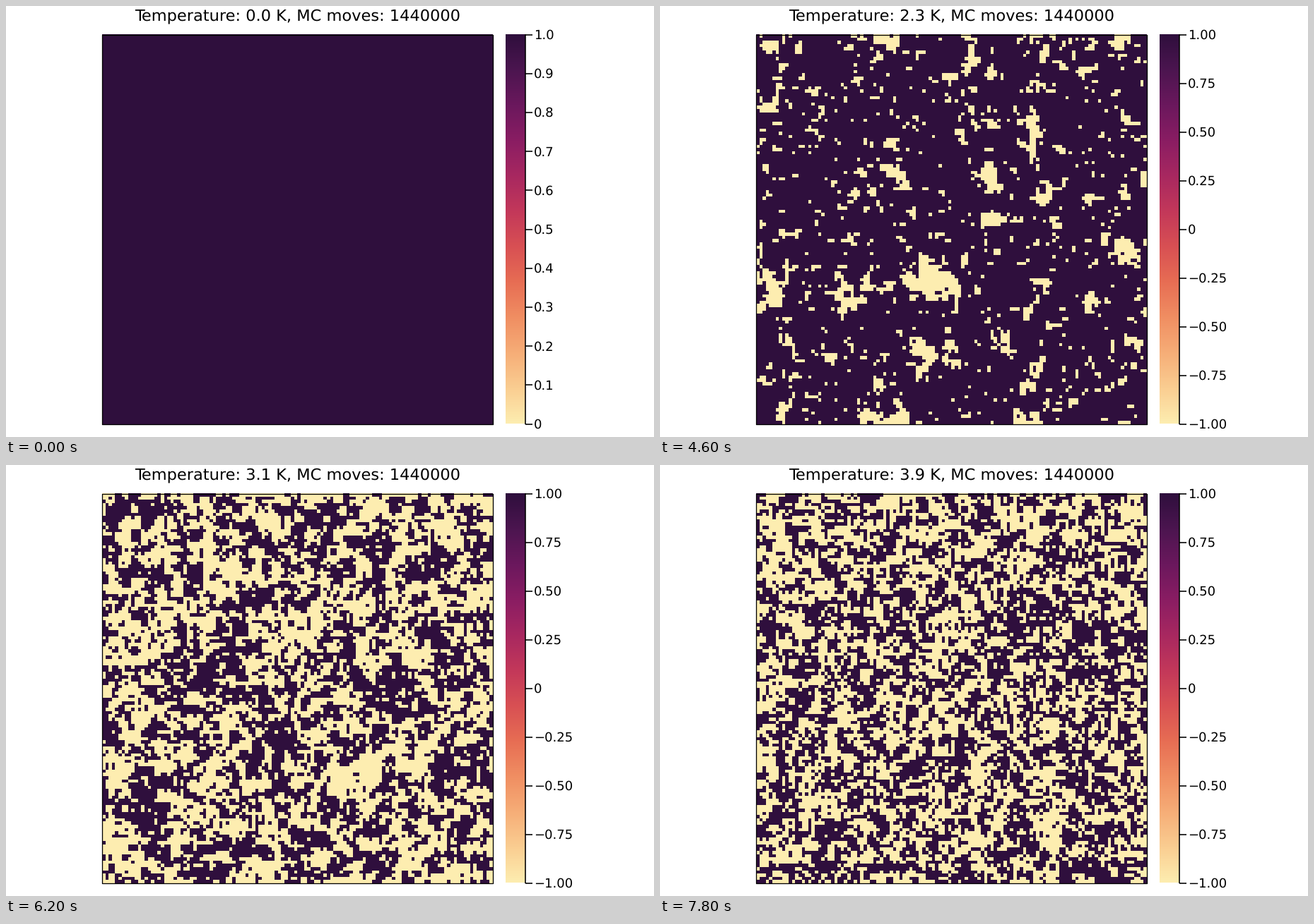
Animation, 917 px wide and 611 px high, one loop 8 s. Source, as a matplotlib script:

```python
import numpy as np
import matplotlib.pyplot as plt
from matplotlib.animation import FuncAnimation
from matplotlib.colors import LinearSegmentedColormap
from matplotlib.patches import Rectangle

W, H, DPI = 917, 611, 100
N = 120            # spins per side
STEPS = 40         # temperatures 0.0 K to 3.9 K
SWEEPS = 60        # lattice sweeps per temperature
LEFT, RIGHT, TOP, BOTTOM = 136, 689, 40, 593
BAR_L, BAR_R = 707, 735

plt.rcParams["font.family"] = "DejaVu Sans"
plt.rcParams["text.hinting"] = "none"

STOPS = [
    (253, 237, 176), (250, 205, 145), (246, 173, 119), (240, 142, 98),
    (231, 109, 84), (216, 80, 83), (195, 56, 90), (168, 40, 96),
    (138, 29, 99), (107, 24, 93), (76, 21, 80), (47, 15, 61),
]
CMAP = LinearSegmentedColormap.from_list(
    "heat", [tuple(c / 255 for c in s) for s in STOPS], N=512)


def simulate():
    """Warm up a periodic Ising lattice, one snapshot per temperature."""
    rng = np.random.default_rng(12)
    spins = np.ones((N, N))
    rows, cols = np.indices((N, N))
    masks = [(rows + cols) % 2 == k for k in (0, 1)]
    shots = []
    for step in range(STEPS):
        temp = max(step / 10, 0.01)
        for _ in range(SWEEPS):
            for mask in masks:
                field = (np.roll(spins, 1, 0) + np.roll(spins, -1, 0)
                         + np.roll(spins, 1, 1) + np.roll(spins, -1, 1))
                p_up = 0.5 * (1 + np.tanh(field / temp))
                drawn = np.where(rng.random((N, N)) < p_up, 1.0, -1.0)
                spins = np.where(mask, drawn, spins)
        shots.append(spins)
    return shots


def px(size):
    """Pixels to points."""
    return size * 72 / DPI


fig = plt.figure(figsize=(W / DPI, H / DPI), dpi=DPI, facecolor="white")
ax = fig.add_axes([0, 0, 1, 1])
ax.axis("off")

shots = simulate()
image = ax.imshow(shots[0], cmap=CMAP, vmin=-1, vmax=1, aspect="auto",
                  interpolation="nearest",
                  extent=(LEFT, RIGHT, BOTTOM, TOP))
ax.imshow(np.linspace(1, 0, 552)[:, None], cmap=CMAP, vmin=0, vmax=1,
          aspect="auto", interpolation="nearest",
          extent=(BAR_L, BAR_R, BOTTOM - 1, TOP))
ax.set_xlim(0, W)
ax.set_ylim(H, 0)

ax.add_patch(Rectangle((LEFT, TOP + 0.5), RIGHT - LEFT, 552, fill=False,
                       ec="black", lw=px(1.3), joinstyle="round"))
ax.plot([BAR_R, BAR_R], [TOP, BOTTOM - 0.5], color="black", lw=px(1.6),
        solid_capstyle="butt")

title = ax.text(412.8, 20, "", fontsize=px(22.5), ha="center", va="baseline")


def make_scale(labels):
    parts = []
    for y, label in zip(np.linspace(BOTTOM - 0.5, TOP + 0.5, len(labels)),
                        labels):
        parts += ax.plot([BAR_R, BAR_R + 9.5], [y, y], color="black",
                         lw=px(1.6), solid_capstyle="butt")
        parts.append(ax.text(747, y + 6.3, label, fontsize=px(18),
                             ha="left", va="baseline"))
    return parts


def tick_text(value, digits):
    if abs(value) < 1e-9:
        return "0"
    return f"{value:.{digits}f}".replace("-", "\u2212")


unit_scale = make_scale([tick_text(k / 10, 1) for k in range(11)])
full_scale = make_scale([tick_text(k / 4, 2) for k in range(-4, 5)])


def update(step):
    spins = shots[step]
    mixed = spins.min() < 0
    image.set_data(spins)
    title.set_text(f"Temperature: {step / 10:.1f} K, MC moves: 1440000")
    for part in unit_scale:
        part.set_visible(not mixed)
    for part in full_scale:
        part.set_visible(mixed)
    return [image, title, *unit_scale, *full_scale]


anim = FuncAnimation(fig, update, frames=STEPS, interval=200,
                     init_func=lambda: update(0), repeat=True,
                     repeat_delay=0, blit=False)
plt.show()
```
